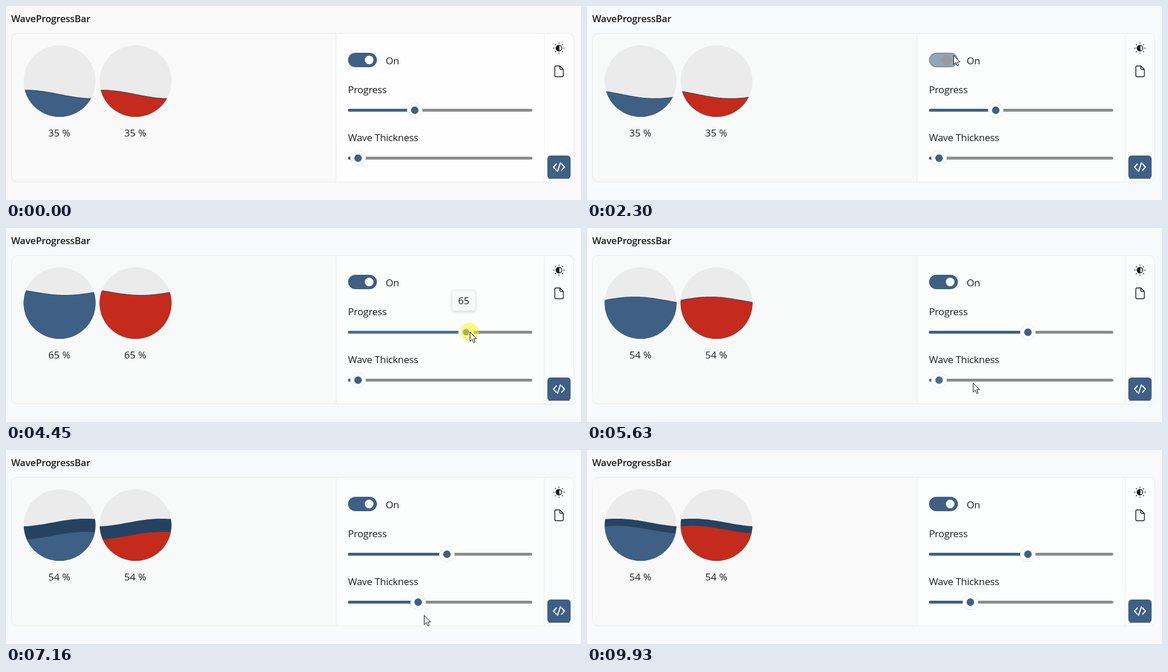
Write an HTML page that moves like this. It is 992x336 px and loops after 10000 ms.

```html
<!DOCTYPE html>
<html lang="en">
<head>
<meta charset="utf-8">
<title>WaveProgressBar</title>
<style>
  html, body { margin: 0; width: 100%; height: 100%; overflow: hidden; }
  svg { display: block; width: 992px; height: 336px; }
  text { font: 17px "Open Sans", "Noto Sans", sans-serif; letter-spacing: -.25px; fill: #1b1b1b; }
  .title { font-size: 16.6px; font-weight: 600; }
  .mid { text-anchor: middle; letter-spacing: 0; }
  .line { fill: none; stroke: #e9eaea; }
  .icon { fill: none; stroke: #1b1b1b; stroke-width: 1.4; stroke-linecap: round; stroke-linejoin: round; }
</style>
</head>
<body>
<svg viewBox="0 0 992 336">
  <defs>
    <clipPath id="disc"><circle cx="62.5" cy="62" r="62"/></clipPath>
    <clipPath id="card"><rect x="9.5" y="47.5" width="970" height="257" rx="10"/></clipPath>
    <filter id="soft" x="-30%" y="-30%" width="160%" height="160%">
      <feDropShadow dx="0" dy="2" stdDeviation="2" flood-opacity=".13"/>
    </filter>
  </defs>

  <rect id="page" width="992" height="336"/>
  <text class="title" x="9" y="28">WaveProgressBar</text>
  <g clip-path="url(#card)">
    <rect id="left" x="9" y="47" width="561" height="258"/>
    <rect id="right" x="569.5" y="47" width="411" height="258"/>
  </g>
  <rect class="line" x="9.5" y="47.5" width="970" height="257" rx="10"/>
  <path class="line" d="M569.5 48V304M928.5 48V304"/>

  <g id="waves"></g>

  <rect id="switch" x="590.5" y="81.5" width="49" height="24" rx="12"/>
  <circle id="knob" cy="93.5"/>
  <text id="state" x="655" y="101"></text>
  <text x="590" y="151">Progress</text>
  <text x="590" y="234">Wave Thickness</text>
  <g id="sliders"></g>

  <g class="icon">
    <circle cx="954" cy="73" r="4.8"/>
    <path d="M954 68.2a4.8 4.8 0 0 0 0 9.6z" fill="#1b1b1b"/>
    <g id="rays"></g>
    <path d="M949 103.700h6.500l6 6v10.600a2.200 2.200 0 0 1-2.200 2.200h-10.300a2.200 2.200 0 0 1-2.200-2.200v-14.400a2.200 2.200 0 0 1 2.200-2.200zM955.500 104v4a1.700 1.700 0 0 0 1.700 1.700h4"/>
  </g>
  <rect x="934.5" y="259.500" width="39" height="39" rx="5" fill="#3e6084" stroke="#36557a"/>
  <path d="M936 298.500h36" stroke="#2c4866"/>
  <path d="M949.500 273.500l-5 5.500 5 5.500M958.500 273.500l5 5.500-5 5.500M956.500 271.500l-5 15" fill="none" stroke="#fff" stroke-width="1.900" stroke-linecap="round" stroke-linejoin="round"/>

  <g id="tip">
    <rect x="-20.500" y="-73" width="41" height="36" rx="4" fill="#f9f9f9" stroke="#e4e4e4" filter="url(#soft)"/>
    <text class="mid" y="-48.500"></text>
  </g>
  <g id="cursor">
    <circle id="press" r="15.500" fill="#fff600" fill-opacity=".5"/>
    <path d="M.5.500V16.500L4.200 13L6.800 18.800L9.200 17.700L6.700 12H11.600Z" fill="#fff" stroke="#111"/>
  </g>
</svg>

<script>
const LOOP = 10000, ACCENT = [62, 96, 132];
const $ = id => document.getElementById(id);
const set = (el, attrs) => { for (const k in attrs) el.setAttribute(k, attrs[k]); };
const clamp = u => Math.max(0, Math.min(1, u));
const smooth = u => u * u * (3 - 2 * u);
const during = (t, spans) => spans.some(([a, b]) => t >= a && t < b);
const mix = (a, b, u) => `rgb(${a.map((v, i) => Math.round(v + (b[i] - v) * u))})`;

// Eased value at time t from keys [time, value]
function track(t, keys) {
  let v = keys[0][1];
  for (let i = 1; i < keys.length; i++) {
    const [a] = keys[i - 1], [b, next] = keys[i];
    v += (next - v) * smooth(clamp((t - a) / (b - a)));
  }
  return v;
}

// Timeline
const progressKeys = [[3560, 35], [4640, 68], [5050, 54]];
const thicknessKeys = [[6100, 1.5], [6850, 37], [8080, 37], [9000, 20]];
const path = [
  [420, 704, 252], [1200, 632, 85], [2330, 632, 85], [2950, 705, 178], [3350, 711, 178],
  [3560, 711, 178], [4640, 808, 180], [5050, 767, 180], [5150, 767, 180], [5600, 667, 268],
  [5950, 608, 264], [6100, 608, 264], [6850, 712, 266], [6950, 712, 266], [7150, 721, 286],
  [7400, 720, 288], [7750, 706, 265], [8080, 706, 265], [9000, 657, 265], [9380, 890, 342]
];
const cursorX = path.map(([t, x]) => [t, x]), cursorY = path.map(([t, , y]) => [t, y]);
const presses = [[1270, 1380], [2120, 2220], [3350, 5130], [6000, 6950], [7800, 9000]];
const OFF_AT = 1380, ON_AT = 2220;

// Repeated parts
$('rays').innerHTML = Array.from({ length: 8 }, (_, i) =>
  `<path d="M954 64.800v-.9" transform="rotate(${i * 45} 954 73)"/>`).join('');

const waves = [[30, '#3e6084'], [161, '#c42b1c']].map(([x, color]) => {
  $('waves').insertAdjacentHTML('beforeend', `<g transform="translate(${x} 68)">
    <g clip-path="url(#disc)"><rect width="125" height="125" fill="#ebebeb"/>
    <path fill="#264261"/><path fill="${color}"/></g>
    <text class="mid" x="62" y="158"></text></g>`);
  const g = $('waves').lastElementChild;
  return { paths: g.querySelectorAll('path'), label: g.querySelector('text') };
});

const sliders = [180.5, 263.5].map(y => {
  $('sliders').insertAdjacentHTML('beforeend', `<g transform="translate(0 ${y})">
    <rect x="590" y="-2.500" width="318" height="5" rx="2.500" fill="#8c8c8c"/>
    <rect x="590" y="-2.500" height="5" rx="2.500"/>
    <circle r="13" fill="#fff" stroke="#e6e6e6"/><circle/></g>`);
  const [, bar, ring, dot] = $('sliders').lastElementChild.children;
  return { y, bar, ring, dot, size: 6.5 };
});

const thumbX = v => 603 + 2.92 * v;

function waveShape(level, height, crest) {
  let d = 'M0 130';
  for (let x = 0; x <= 126; x += 3)
    d += `L${x} ${(level - height * Math.cos(2 * Math.PI * (x - crest) / 230)).toFixed(2)}`;
  return d + 'V130Z';
}

function drawSlider(s, v, hover, pressed) {
  const x = thumbX(v), fill = hover ? '#4a6e95' : '#3e6084';
  set(s.bar, { width: x - 590, fill });
  set(s.ring, { cx: x });
  set(s.dot, { cx: x, fill, r: pressed ? 5.5 : hover === 2 ? 8.5 : 6.5 });
}

function draw(t) {
  const progress = track(t, progressKeys), thickness = track(t, thicknessKeys);
  const x = track(t, cursorX), y = track(t, cursorY);
  const on = t < OFF_AT || t >= ON_AT;

  const tint = clamp((t - 400) / 300) * (1 - clamp((t - 9750) / 270));
  set($('page'), { fill: mix([249, 249, 249], [246, 250, 253], tint) });
  set($('left'), { fill: mix([249, 249, 249], [248, 250, 249], tint) });
  set($('right'), { fill: mix([254, 254, 254], [252, 254, 253], tint) });

  const level = 134.1 - 1.416 * progress, height = 8.4 - .031 * progress;
  const crest = 5 - 230 * t / 2015;
  for (const { paths, label } of waves) {
    set(paths[0], { d: waveShape(level, height, crest) });
    set(paths[1], { d: waveShape(level + .62 * thickness, height, crest) });
    label.textContent = on ? Math.round(progress) + ' %' : '';
  }

  const k = 1 - clamp((t - OFF_AT) / 150) + clamp((t - ON_AT) / 150);
  set($('switch'), { fill: mix([244, 245, 245], ACCENT, k), stroke: mix([135, 135, 135], ACCENT, k) });
  set($('knob'), {
    cx: 602.5 + 24 * (1 - (1 - k) ** 1.7),
    r: 7.5 + 1.5 * Math.sin(Math.PI * k),
    fill: mix([93, 93, 93], [255, 255, 255], k * k * 1.3 > 1 ? 1 : k * k * 1.3)
  });
  $('state').textContent = on ? 'On' : 'Off';

  const shown = t >= 420 && t < 9380;
  const tips = [during(t, [[3560, 5160]]), during(t, [[6080, 6980], [7880, 9030]])];
  const values = [progress, thickness];
  sliders.forEach((s, i) => {
    const near = shown && Math.abs(y - s.y) < 16 && x > 585 && x < 912;
    const over = near && Math.abs(x - thumbX(values[i])) < 14;
    drawSlider(s, values[i], over ? 2 : near ? 1 : 0, tips[i]);
  });

  const active = tips.indexOf(true);
  set($('tip'), { visibility: active < 0 ? 'hidden' : 'visible' });
  if (active >= 0) {
    set($('tip'), { transform: `translate(${thumbX(values[active]) - 4} ${sliders[active].y})` });
    $('tip').lastElementChild.textContent = Math.round(values[active]);
  }

  set($('cursor'), { transform: `translate(${x} ${y})`, visibility: shown ? 'visible' : 'hidden' });
  set($('press'), { display: during(t, presses) ? 'inline' : 'none' });
}

const start = performance.now();
function tick() {
  draw((performance.now() - start) % LOOP);
  requestAnimationFrame(tick);
}
tick();
</script>
</body>
</html>
```
